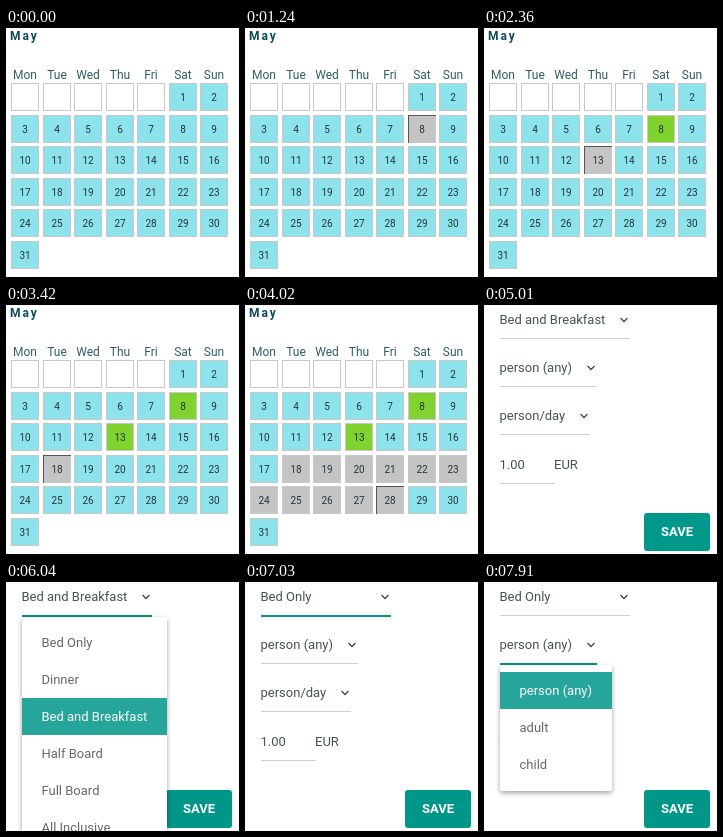
Write an HTML page with a canvas that moves like this. It is 233x249 px and loops after 8 s.

```html
<!DOCTYPE html>
<html lang="en">
<head>
<meta charset="utf-8">
<title>Calendar and meal plan</title>
<style>
html, body { margin: 0; width: 100%; height: 100%; overflow: hidden; background: #fff; }
canvas { display: block; width: 233px; height: 249px; }
</style>
</head>
<body>
<canvas id="stage" width="233" height="249"></canvas>
<script>
const LOOP = 8000;
const FORM_START = 5010;
const FONT = 'Roboto, Arial, sans-serif';
const TEAL = '#009688';
const CYAN = '#8ce3eb';
const GREEN = '#80d22f';
const GREY = '#c4c4c4';
const INK = '#4a5252';
const WEEKDAYS = ['Mon', 'Tue', 'Wed', 'Thu', 'Fri', 'Sat', 'Sun'];
const FIRST_COLUMN = 5;

// [time, day under the pointer]
const POINTER = [
  [210, 30], [290, 23], [380, 16], [780, 9], [910, 8], [1700, 7],
  [1960, 14], [2030, 13], [2650, 12], [2740, 11], [2830, 18],
  [3490, 19], [3620, 20], [3820, 21], [4020, 28]
];
const DRAGS = [
  { press: 1240, release: 1320, from: 8, to: 8 },
  { press: 2360, release: 2560, from: 13, to: 13 },
  { press: 3420, release: 4610, from: 18, to: 28 }
];

const MEALS = {
  x: 16, y: 35, width: 145, selected: 2, open: 5900, close: 7030, fade: 140,
  items: ['Bed Only', 'Dinner', 'Bed and Breakfast', 'Half Board', 'Full Board', 'All Inclusive'],
  hovers: [[1, 6360, 6530], [0, 6530, LOOP]]
};
const GUESTS = {
  x: 16, y: 83, width: 112, selected: 0, open: 7690, close: LOOP, fade: 260,
  items: ['person (any)', 'adult', 'child'], hovers: []
};

const ctx = document.getElementById('stage').getContext('2d');
const clamp = v => Math.min(1, Math.max(0, v));

function rect(x, y, w, h, color) {
  ctx.fillStyle = color;
  ctx.fillRect(x, y, w, h);
}

function text(str, x, y, size, color, { weight = 400, align = 'left', spacing = 0 } = {}) {
  ctx.font = `${weight} ${size}px ${FONT}`;
  ctx.letterSpacing = spacing + 'px';
  ctx.textAlign = align;
  ctx.fillStyle = color;
  ctx.fillText(str, x, y);
}

function roundBox(x, y, w, h, r, color) {
  ctx.beginPath();
  ctx.roundRect(x, y, w, h, r);
  ctx.fillStyle = color;
  ctx.fill();
}

function pointerDay(t) {
  let day = 0;
  for (const [time, target] of POINTER) if (t >= time) day = target;
  return day;
}

function dayColor(day, hovered, t) {
  if (day < 1) return '#fff';
  for (const { press, release, from, to } of DRAGS) {
    const end = t >= release ? to : hovered;
    if (t >= press && day >= from && day <= end) return t >= release ? GREEN : GREY;
  }
  return CYAN;
}

function drawCell(index, hovered, t) {
  const x = Math.round(5 + 31.5 * (index % 7));
  const y = Math.floor(55.5 + 31.5 * Math.floor(index / 7));
  const day = index - FIRST_COLUMN + 1;
  rect(x, y, 28, 28, '#c8c8c8');
  if (day > 0 && day === hovered) {
    rect(x, y, 28, 1, '#555');
    rect(x, y, 1, 28, '#555');
  }
  rect(x + 1, y + 1, 26, 26, dayColor(day, hovered, t));
  if (day > 0) text(day, x + 14, y + 18, 10, '#263238', { align: 'center' });
}

function drawCalendar(t) {
  text('May', 4, 12, 12, '#0d4a5c', { weight: 700, spacing: 2 });
  WEEKDAYS.forEach((name, i) =>
    text(name, Math.round(5 + 31.5 * i) + 14, 51, 12, '#2f5d66', { align: 'center' }));
  const hovered = pointerDay(t);
  for (let i = 0; i < FIRST_COLUMN + 31; i++) drawCell(i, hovered, t);
}

function drawField(label, baseline, width, active, hasChevron = true) {
  text(label, 15.5, baseline, 13, INK);
  rect(16, baseline + 14, width, active ? 2 : 1, active ? TEAL : '#d0d0d0');
  if (!hasChevron) return;
  const x = 16 + width - 6;
  const y = baseline - 6;
  ctx.beginPath();
  ctx.moveTo(x - 3.5, y);
  ctx.lineTo(x, y + 3.5);
  ctx.lineTo(x + 3.5, y);
  ctx.strokeStyle = '#444';
  ctx.lineWidth = 1.3;
  ctx.stroke();
}

function itemColor(menu, index, t) {
  if (index === menu.selected) return '#fff';
  let amount = 0;
  for (const [item, start, end] of menu.hovers) {
    if (item === index) amount = clamp((t - start) / 170) * (1 - clamp((t - end) / 170));
  }
  const shade = Math.round(104 - 60 * amount);
  return `rgb(${shade},${shade},${shade})`;
}

function drawMenu(menu, t) {
  if (t < menu.open || t >= menu.close) return;
  const p = clamp((t - menu.open + 20) / menu.fade);
  const scale = 1 - 0.7 * Math.pow(1 - p, 5);
  const height = 15 + 37 * menu.items.length;
  ctx.save();
  ctx.globalAlpha = 1 - (1 - p) ** 2;
  ctx.translate(menu.x, menu.y);
  ctx.scale(scale, scale);
  ctx.shadowColor = 'rgba(0,0,0,.38)';
  ctx.shadowBlur = 5;
  ctx.shadowOffsetY = 2;
  roundBox(0, 0, menu.width, height, 2, '#fff');
  ctx.shadowColor = 'transparent';
  menu.items.forEach((item, i) => {
    const y = 7 + 37 * i;
    if (i === menu.selected) rect(0, y, menu.width, 37, '#26a69a');
    text(item, 19.5, y + 23, 13, itemColor(menu, i, t));
  });
  ctx.restore();
}

function drawForm(t) {
  const meal = t < MEALS.close ? 'Bed and Breakfast' : 'Bed Only';
  drawField(meal, 19, 130, t >= MEALS.open && t < GUESTS.open);
  drawField('person (any)', 67, 97, t >= GUESTS.open);
  drawField('person/day', 115, 90, false);
  drawField('1.00', 164, 55, false, false);
  text('EUR', 70, 164, 13, INK);
  roundBox(160, 208, 66, 38, 3, t < 5150 ? '#00988a' : TEAL);
  text('SAVE', 193, 231, 13, '#fff', { weight: 700, align: 'center' });
  drawMenu(MEALS, t);
  drawMenu(GUESTS, t);
}

function frame() {
  const t = performance.now() % LOOP;
  rect(0, 0, 233, 249, '#fff');
  if (t < FORM_START) drawCalendar(t);
  else drawForm(t);
  requestAnimationFrame(frame);
}
frame();
</script>
</body>
</html>
```
